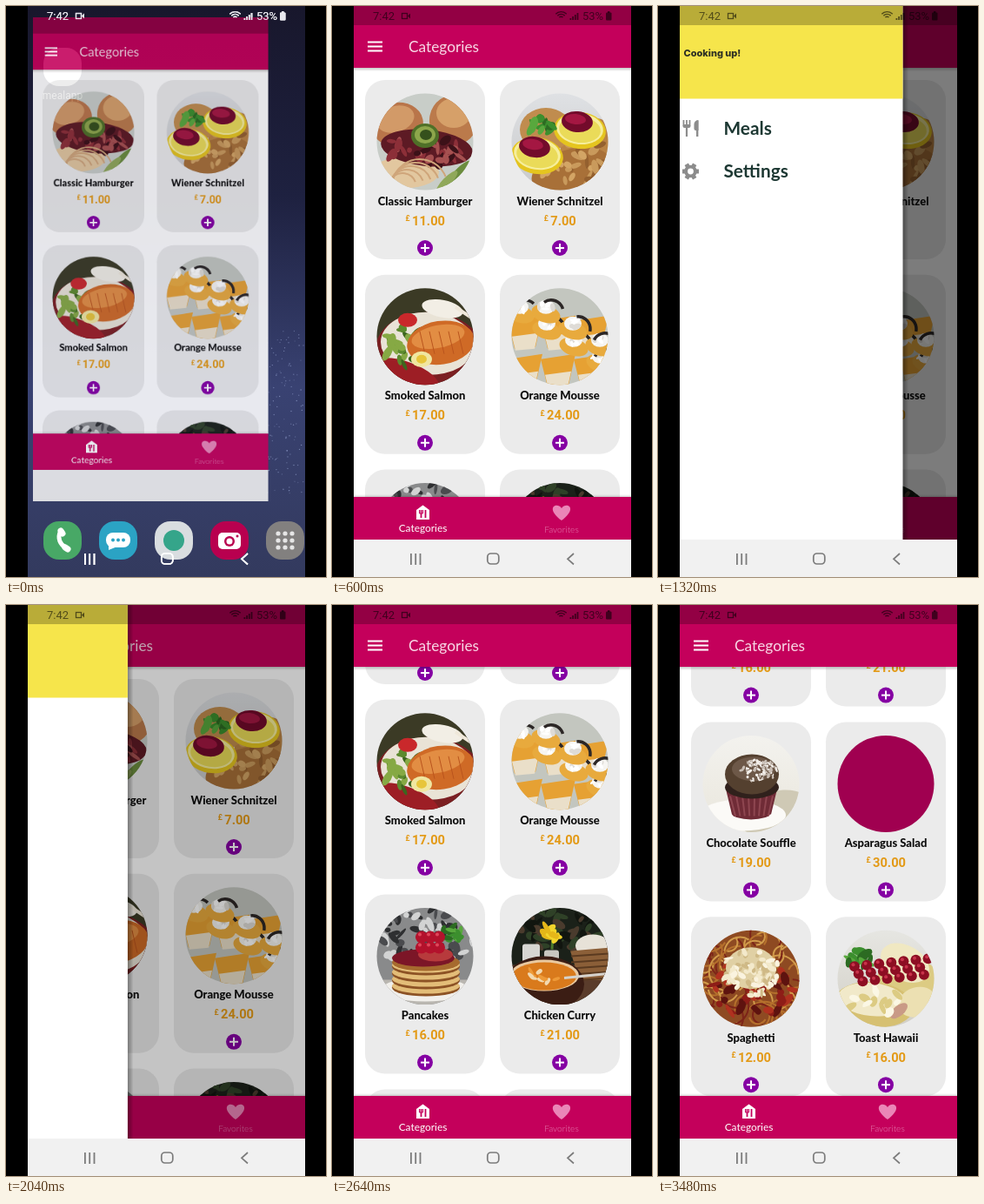
Write an HTML page with a canvas that moves like this. It is 368 by 656 pixels and loops after 3600 ms.

```html
<!DOCTYPE html>
<html lang="en">
<head>
<meta charset="utf-8">
<title>Meal app</title>
<style>
html, body { margin: 0; width: 368px; height: 656px; overflow: hidden; background: #000; }
canvas { display: block; }
</style>
</head>
<body>
<canvas id="stage" width="368" height="656"></canvas>
<script>
const LOOP = 3600, STEP = 120, W = 368, H = 656, LEFT = 25, RIGHT = 344, TAU = Math.PI * 2;
const PINK = '#c4005b', BERRY = '#a00050', DRAWER = 269;

const out = document.getElementById('stage').getContext('2d');
const layer = document.createElement('canvas');
layer.width = W;
layer.height = H;
const app = layer.getContext('2d');
let g = app;

// ---------- drawing helpers ----------
const clamp = v => Math.max(0, Math.min(1, v));
const rnd = i => { const v = Math.sin(i * 12.9898 + 4.1) * 43758.5453; return v - Math.floor(v); };

function rect(c, x, y, w, h, r = 0) {
  g.fillStyle = c;
  g.beginPath();
  g.roundRect(x, y, w, h, r);
  g.fill();
}
function ell(c, x, y, rx, ry = rx, rot = 0) {
  g.fillStyle = c;
  g.beginPath();
  g.ellipse(x, y, rx, ry, rot, 0, TAU);
  g.fill();
}
function line(c, w, ...p) {
  g.strokeStyle = c;
  g.lineWidth = w;
  g.beginPath();
  for (let i = 0; i < p.length; i += 2) g.lineTo(p[i], p[i + 1]);
  g.stroke();
}
function poly(c, ...p) {
  g.fillStyle = c;
  g.beginPath();
  for (let i = 0; i < p.length; i += 2) g.lineTo(p[i], p[i + 1]);
  g.fill();
}
function arc(c, w, x, y, r, a = 0, b = TAU) {
  g.strokeStyle = c;
  g.lineWidth = w;
  g.beginPath();
  g.arc(x, y, r, a, b);
  g.stroke();
}
function text(s, x, y, font, c, align = 'left') {
  g.font = font;
  g.fillStyle = c;
  g.textAlign = align;
  g.fillText(s, x, y);
}
function fade(y0, y1, ...colors) {
  const f = g.createLinearGradient(0, y0, 0, y1);
  colors.forEach((c, i) => f.addColorStop(i / (colors.length - 1), c));
  return f;
}
// n random specks inside an ellipse
function specks(n, seed, colors, x, y, rx, ry, size) {
  for (let i = 0; i < n; i++) {
    const k = seed + i * 5, a = rnd(k) * TAU, d = Math.sqrt(rnd(k + 1));
    ell(colors[i % colors.length], x + Math.cos(a) * d * rx, y + Math.sin(a) * d * ry,
      size * (0.5 + rnd(k + 2)), size * (0.3 + rnd(k + 3) * 0.5), rnd(k + 4) * 3);
  }
}
const back = c => rect(c, -56, -56, 112, 112);

// ---------- dishes, centred on 0,0 in a circle of radius 55 ----------
function hamburger() {
  back('#c8cdc8');
  ell('#b9754a', -32, -20, 30, 25, -.2);
  ell('#d29a68', -34, -26, 22, 15, -.3);
  ell('#bb7a4b', 33, -25, 28, 29, .2);
  ell('#d6a069', 33, -33, 20, 17);
  ell('#e2c79f', -22, 35, 38, 18);
  ell('#5d1a24', 2, 7, 53, 21, .1);
  specks(45, 10, ['#8c2f38', '#3c1118', '#a65050'], 0, 8, 50, 19, 6);
  for (let i = 0; i < 5; i++) arc('#cfa57a', 2, -26 + i * 5, 52, 16 + i * 4, 3.3, 5.9);
  ell('#6b8c3d', 39, 42, 25, 9, -.9);
  ell('#90a85a', 25, 46, 17, 5, -.8);
  ell('#4f7028', 0, -7, 16, 14);
  ell('#8da64b', 0, -8, 12, 10);
  ell('#35501c', 1, -8, 7, 6);
}
function lemon(x, y, rot) {
  ell('#e5c51f', x, y + 2, 30, 21, rot);
  ell('#f6ee9c', x, y, 27, 18, rot);
  ell('#eadb59', x, y + 1, 24, 15, rot);
  ell('#730b2b', x - 3, y - 8, 18, 12, rot);
  ell('#a41742', x - 5, y - 11, 12, 6, rot);
}
function leaves(x, y, size, seed) {
  specks(16, seed, ['#3c8f2e', '#2c6b22', '#58a83d'], x, y, size, size * .6, size * .4);
}
function schnitzel() {
  back(fade(-56, 56, '#dfe1e4', '#c8c9ca'));
  ell('#b98345', 36, 8, 35, 36, .5);
  ell('#a87038', 12, 32, 46, 23, -.3);
  ell('#c08c4e', -16, -14, 30, 25);
  specks(40, 60, ['#c99a5c', '#94602f', '#d3a565'], 18, 24, 45, 28, 6);
  lemon(-26, 14, .15);
  lemon(23, -15, .1);
  leaves(-20, -19, 16, 90);
}
function salmon() {
  back('#3b3a25');
  ell('#7b1f22', 5, 16, 62, 44, .05);
  ell('#e9e3d6', 3, 8, 54, 36, .05);
  ell('#9d1e25', -22, 44, 40, 15, .35);
  ell('#f2eee5', 20, -32, 24, 10, .2);
  line('#efe8da', 4, 35, -34, 56, -20);
  specks(30, 120, ['#5c8a2e', '#3d661f', '#86a944'], -22, 10, 27, 23, 7);
  ell('#c9282b', -20, -19, 11, 8);
  ell('#cf6a26', 18, 7, 39, 25, -.15);
  ell('#e28d43', 15, 0, 31, 13, -.2);
  for (let i = 0; i < 5; i++) line('#b9541d', 1, -6 + i * 11, -6, i * 11, 20);
  ell('#f0e6a0', -4, 26, 12, 9);
  ell('#e7c53a', -4, 26, 6, 5);
}
function mousse() {
  back('#c3c6bf');
  for (let i = 0; i < 6; i++) {
    const x = -40 + i % 3 * 38, y = -18 + Math.floor(i / 3) * 44;
    poly('#e6a133', x - 20, y, x + 20, y - 6, x + 12, y + 30, x - 12, y + 32);
    poly('#eadfc9', x - 15, y + 18, x + 15, y + 14, x + 11, y + 32, x - 11, y + 34);
  }
  for (let i = 0; i < 7; i++) {
    const x = -46 + i * 31 % 94, y = -34 + i % 4 * 19;
    ell('#e8aa3d', x, y + 8, 17, 10, .3);
    ell('#f6f5f2', x, y, 10, 8);
    specks(5, 170 + i * 30, ['#fff', '#dedbd6'], x, y, 8, 6, 4);
    arc('#2c2726', 3.5, x + 6, y + 6, 14, 3.6 + i % 3 * .5, 5.5 + i % 3 * .5);
  }
}
function pancakes() {
  back('#898a8b');
  specks(75, 300, ['#2e2f31', '#d2d3d3', '#4a4b4e'], 0, -20, 56, 40, 6);
  rect('#b9b6b0', -56, 27, 112, 30);
  ell('#f1efeb', 0, 38, 50, 14);
  for (let i = 0; i < 4; i++) {
    const y = 34 - i * 8;
    ell('#8d5325', 1, y + 2, 39, 10);
    ell('#e3bd78', 1, y, 39, 9);
  }
  ell('#a66a2e', 1, 7, 39, 10);
  ell('#7c1627', -2, 2, 36, 10);
  ell('#b73a3c', 12, -2, 20, 8);
  leaves(29, -26, 14, 430);
  for (let i = 0; i < 6; i++) {
    ell('#b3122c', -4 + i % 3 * 10, -22 + Math.floor(i / 3) * 12, 7);
    ell('#e0465a', -6 + i % 3 * 10, -25 + Math.floor(i / 3) * 12, 2);
  }
}
function curry() {
  back('#1b2119');
  specks(40, 500, ['#2f4127', '#4a3b2d', '#11150f'], 0, -34, 54, 25, 7);
  rect('#5a3c2b', -56, 10, 112, 48);
  rect('#d7d6d2', -43, -14, 20, 24, 3);
  rect('#c8c7c0', -18, -7, 17, 21, 3);
  line('#4c7a2c', 3, -9, -8, -8, -26);
  specks(14, 560, ['#f3d52b', '#e5b719'], -8, -27, 11, 8, 6);
  ell('#e7e2d8', 38, -12, 20, 13);
  poly('#8b5f38', 12, -6, 58, -10, 56, 28, 22, 26);
  for (let i = 0; i < 5; i++) line('#5a3a20', 2, 13, i * 7, 56, -3 + i * 7);
  ell('#3b1d14', -18, 32, 46, 32);
  ell('#e9c9a0', -18, 22, 40, 18);
  ell('#d97a1c', -18, 23, 37, 16);
  specks(10, 590, ['#f2d9b0', '#ee9a38'], -20, 23, 20, 8, 4);
  line('#d5d2cc', 3, 5, 25, 55, 20);
}
function souffle() {
  back(fade(-56, 56, '#f3f2ee', '#e9e6dc'));
  ell('#cfc9b5', 28, 34, 42, 25, -.3);
  ell('#fbfaf7', -10, 36, 50, 18);
  poly('#6f2b36', -29, 6, 30, 6, 23, 35, -22, 35);
  ell('#6f2b36', 0, 34, 22, 7);
  for (let i = 0; i < 8; i++) line('#8e4650', 2, -24 + i * 7, 14, -18 + i * 5.4, 37);
  ell('#30211c', 1, 4, 31, 13);
  ell('#54402f', 1, -11, 31, 23);
  ell('#6d5848', 3, -17, 25, 14);
  specks(80, 640, ['#f2eee9', '#c9bfb6'], 9, -15, 21, 13, 2.2);
}
function spaghetti() {
  back('#8e4a22');
  for (let i = 0; i < 75; i++) {
    const a = rnd(i + 900) * TAU;
    arc(['#d19a4a', '#b5702c', '#7d2418'][i % 3], 2,
      (rnd(i + 700) - .5) * 115, (rnd(i + 800) - .5) * 115, 10 + i % 4 * 4, a, a + 2.4);
  }
  specks(60, 1000, ['#8e1d17', '#b0311f', '#5e130f'], 0, 10, 48, 34, 6);
  ell('#e0d0a4', 0, -12, 29, 24);
  specks(90, 1400, ['#f3e9cb', '#cfb986', '#faf3df'], 0, -8, 33, 28, 4);
}
function toast() {
  back(fade(-56, 56, '#e6e6e2', '#d2cfc6'));
  ell('#dccb83', 28, 2, 38, 27, .3);
  ell('#f0e8c2', 22, -18, 30, 20, .5);
  ell('#d6c072', -14, 30, 46, 26, .1);
  ell('#f1e9c9', -16, 24, 39, 19, .1);
  ell('#ece0b2', 36, 27, 22, 17, -.3);
  ell('#c99a86', 15, 37, 12, 6, -.7);
  specks(14, 1900, ['#fbf7e4', '#dccb83'], -5, 28, 40, 17, 6);
  leaves(-32, -25, 17, 2000);
  for (let i = 0; i < 19; i++) {
    const x = -36 + i * 4.7, y = -14 - i * .5 + (i % 3) * 9;
    ell('#8d0e23', x, y, 6);
    ell('#c8334a', x - 1.5, y - 2, 2);
  }
}

// name, price, picture, time from which the picture is loaded
const meals = [
  ['Classic Hamburger', '11.00', hamburger, 0], ['Wiener Schnitzel', '7.00', schnitzel, 0],
  ['Smoked Salmon', '17.00', salmon, 0], ['Orange Mousse', '24.00', mousse, 0],
  ['Pancakes', '16.00', pancakes, 0], ['Chicken Curry', '21.00', curry, 0],
  ['Chocolate Souffle', '19.00', souffle, 3000], ['Asparagus Salad', '30.00', null, LOOP],
  ['Spaghetti', '12.00', spaghetti, 3240], ['Toast Hawaii', '16.00', toast, 3240]
];

// ---------- motion ----------
const scrollStops = [0, 30, 105, 200, 315, 415, 498, 560, 596, 615, 622];
function scrollAt(t) {
  const i = Math.max(0, Math.min(scrollStops.length - 1, Math.floor((t - 2280) / STEP)));
  return scrollStops[i];
}
// part of the way left for a critically damped spring
function spring(ms) {
  if (ms <= 0) return 1;
  const k = ms * 0.02236;
  return (1 + k) * Math.exp(-k);
}
const drawerAt = t => {
  const p = t < 1950 ? 1 - spring(t - 1104) : spring(t - 1954);
  return p < .004 ? 0 : p;
};

// ---------- screen parts ----------
function card([name, price, dish, ready], x, y, t) {
  const cx = x + 69;
  rect('#ebebeb', x, y, 138, 206, 23);
  g.save();
  g.translate(cx, y + 71);
  g.beginPath();
  g.arc(0, 0, 55.5, 0, TAU);
  g.clip();
  if (t >= ready) dish(); else back(BERRY);
  g.restore();
  text(name, cx, y + 143.5, '800 13px Lato, sans-serif', '#0c0c0c', 'center');
  text(price, cx + 4, y + 166.5, 'bold 14.7px Roboto, sans-serif', '#e39a17', 'center');
  const half = g.measureText(price).width / 2;
  text('£', cx + 1.5 - half, y + 162, 'bold 8.5px Roboto, sans-serif', '#e39a17', 'right');
  ell('#8500a3', cx, y + 193, 9);
  line('#fff', 2, cx - 5, y + 193, cx + 5, y + 193);
  line('#fff', 2, cx, y + 188, cx, y + 198);
}
function shadow(y, h, a, b) {
  rect(fade(y, y + h, `rgba(0,0,0,${a})`, `rgba(0,0,0,${b})`), LEFT, y, 319, h);
}
function heart(c, x, y) {
  g.fillStyle = c;
  g.beginPath();
  g.moveTo(x, y + 9);
  g.bezierCurveTo(x - 20, y - 6, x - 5, y - 13, x, y - 5);
  g.bezierCurveTo(x + 5, y - 13, x + 20, y - 6, x, y + 9);
  g.fill();
}
function bars() {
  shadow(71, 4, .22, 0);
  rect(PINK, LEFT, 0, 319, 71);
  for (let i = 0; i < 3; i++) rect('#fff', 41, 40.5 + i * 5, 17, 2);
  text('Categories', 88, 52.5, '17.3px Lato, sans-serif', '#f8d9e7');
  shadow(561, 3, 0, .15);
  rect(PINK, LEFT, 564, 319, 49);
  poly('#fff', 104.5, 573.5, 112, 579, 112, 590, 97, 590, 97, 579);
  line(PINK, 1.8, 102.5, 579, 102.5, 588);
  line(PINK, 1, 100.5, 579, 100.5, 583, 104.5, 583, 104.5, 579);
  line(PINK, 1.8, 107.5, 579, 107.5, 588);
  text('Categories', 104.5, 604, '11.9px Lato, sans-serif', '#fff', 'center');
  heart('#ea86b7', 264, 582);
  text('Favorites', 264, 604.5, '300 10.2px Lato, sans-serif', '#e680b3', 'center');
}
function drawer(p) {
  if (!p) return;
  rect(`rgba(0,0,0,${.54 * p})`, LEFT, 0, 319, 613);
  const x = LEFT - DRAWER * (1 - p), gray = '#8c8c8c', ink = '#1d3833';
  const edge = x + DRAWER;
  for (let i = 0; i < 6; i++) rect('rgba(0,0,0,.06)', edge, 0, 6 - i, 613);
  rect('#fff', x, 0, DRAWER, 613);
  rect('#f6e54b', x, 0, DRAWER, 106.5);
  text('Cooking up!', x + 17, 57.5, '800 11px Inter, sans-serif', '#2d3024');
  // fork and knife
  const cx = x + 25;
  for (let i = 0; i < 3; i++) line(gray, 1.8, cx - 8 + i * 3.5, 131, cx - 8 + i * 3.5, 138);
  rect(gray, cx - 9, 136, 9, 4, 2);
  line(gray, 2.2, cx - 4.5, 138, cx - 4.5, 150);
  rect(gray, cx + 4, 131, 5, 12, [5, 0, 0, 2]);
  line(gray, 2.4, cx + 7.7, 132, cx + 7.7, 150);
  // gear
  for (let i = 0; i < 3; i++) {
    const c = Math.cos(i * Math.PI / 3) * 9.5, s = Math.sin(i * Math.PI / 3) * 9.5;
    line(gray, 5, cx - c, 190 - s, cx + c, 190 + s);
  }
  ell(gray, cx, 190, 7.3);
  ell('#fff', cx, 190, 3.4);
  text('Meals', x + 63, 147.5, 'bold 20.8px Lato, sans-serif', ink);
  text('Settings', x + 63, 197, 'bold 20.8px Lato, sans-serif', ink);
}
function drawApp(t) {
  g = app;
  g.save();
  g.beginPath();
  g.rect(LEFT, 0, 319, H);
  g.clip();
  rect('#fff', LEFT, 0, 319, H);
  const top = 85 - scrollAt(t);
  meals.forEach((m, i) => {
    const y = top + Math.floor(i / 2) * 223.8;
    if (y < 564 && y > -206) card(m, i % 2 ? 193 : 38, y, t);
  });
  bars();
  drawer(drawerAt(t));
  rect('rgba(0,0,0,.25)', LEFT, 0, 319, 22);
  rect('#f1f1f1', LEFT, 613, 319, 43);
  g.restore();
}
function home() {
  rect(fade(0, H, '#18172c', '#1e2140', '#394272', '#333a5e'), LEFT, 0, 319, H);
  for (let i = 0; i < 110; i++)
    ell(`rgba(170,185,230,${.2 + rnd(i) * .4})`, 300 + rnd(i + 200) * 43, 370 + rnd(i + 400) * 190, .7);
  rect('#fff', 43, 48, 44, 44, 18);
  text('mealapp', 65, 107, '12px Roboto, sans-serif', '#fff', 'center');
  ['#48a866', '#2ba3c4', '#d9dde0', '#b8004f', '#82807f'].forEach((c, i) => rect(c, 43 + i * 64, 592, 44, 44, 18));
  // handset
  g.lineCap = 'round';
  arc('#fff', 5, 74, 610, 13, 2, 3.75);
  line('#fff', 7, 63, 603, 65, 606);
  line('#fff', 7, 68, 622, 71, 624);
  g.lineCap = 'butt';
  // chat bubble
  rect('#fff', 115, 605, 28, 17, 8);
  poly('#fff', 118, 615, 118, 625, 128, 621);
  for (let i = 0; i < 3; i++) ell('#2ba3c4', 123 + i * 6, 613.5, 2);
  ell('#35a58a', 193, 614, 12);
  // camera
  rect('#fff', 244, 605, 26, 19, 5);
  ell('#b8004f', 257, 615, 6);
  ell('#fff', 257, 615, 3.5);
  ell('#b8004f', 266, 609, 1.5);
  for (let i = 0; i < 9; i++) ell('#e6e6e6', 313 + i % 3 * 8, 606 + Math.floor(i / 3) * 8, 2.6);
}
function systemBars(light) {
  const c = light ? '#e8e8ee' : 'rgba(0,0,0,.56)', nav = light ? '#fff' : '#7b7b7b';
  text('7:42', 47, 16, '13px Roboto, sans-serif', c);
  g.strokeStyle = c;
  g.lineWidth = 1.3;
  g.strokeRect(80.5, 8.5, 6, 6);
  poly(c, 87, 11.5, 90, 8.5, 90, 14.5);
  for (let i = 1; i < 4; i++) arc(c, 1.4, 263.5, 15, i * 2.8, -2.4, -.75);
  for (let i = 0; i < 4; i++) rect(c, 273.5 + i * 2.7, 14 - i * 2, 1.8, 2 + i * 2);
  text('53%', 288, 16, '13px Roboto, sans-serif', c);
  rect(c, 315, 7.5, 6.5, 9, 1);
  rect(c, 317, 6, 2.5, 2);

  for (let i = 0; i < 3; i++) rect(nav, 90 + i * 5.3, 629, 1.8, 13);
  g.strokeStyle = nav;
  g.lineWidth = 1.7;
  g.beginPath();
  g.roundRect(178.8, 629, 13, 12, 4);
  g.stroke();
  line(nav, 1.7, 278, 629, 271, 635.3, 278, 641.5);
}

function frame(now) {
  const t = Math.floor(now % LOOP / STEP) * STEP;
  drawApp(t);
  g = out;
  rect('#000', 0, 0, W, H);
  const rest = Math.pow(1 - clamp(t / 360), 3);
  if (rest) home();
  if (t === 0) systemBars(true);
  const s = 1 - .152 * rest;
  g.save();
  g.globalAlpha = 1 - .115 * rest;
  g.translate(LEFT + 6 * rest, 13 * rest);
  g.scale(s, s);
  g.drawImage(layer, -LEFT, 0);
  g.restore();
  systemBars(t === 0);
  requestAnimationFrame(now => frame(now - start));
}
const start = performance.now();
frame(0);
</script>
</body>
</html>
```
